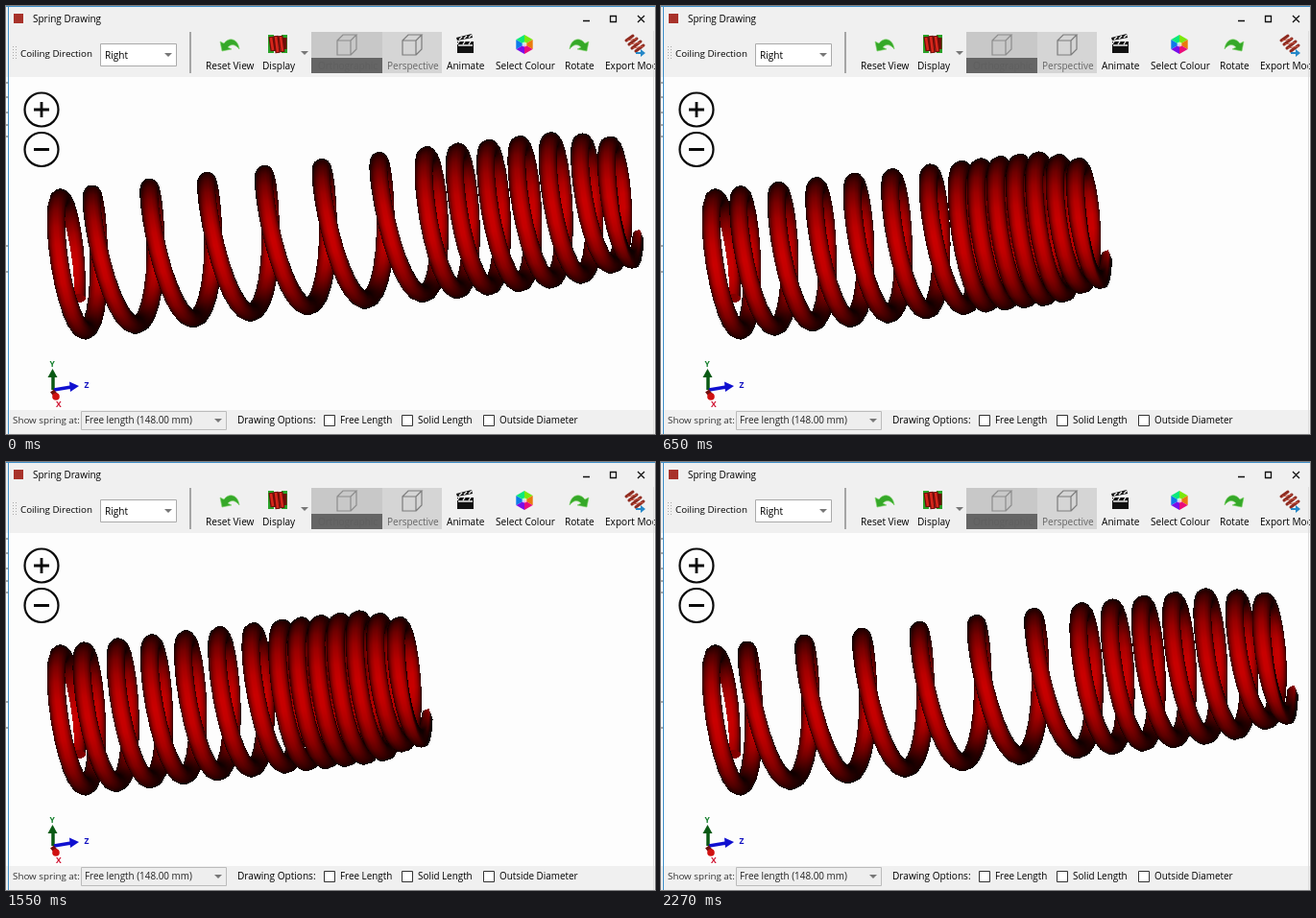
Write an HTML page with a canvas that moves like this. It is 676 px wide and 446 px high and loops after 2.31 s.

```html
<!DOCTYPE html>
<html lang="en">
<head>
<meta charset="utf-8">
<title>Spring Drawing</title>
<style>
html, body { margin: 0; width: 100%; height: 100%; overflow: hidden; background: #fff; }
svg, canvas { position: absolute; left: 0; top: 0; width: 676px; height: 446px; }
text { font-family: "Open Sans", "Noto Sans", sans-serif; }
</style>
</head>
<body>
<svg viewBox="0 0 676 446">
  <defs>
    <path id="turn" d="M-10 -3L-8 7L2 5L-2 3C2 -1 6 0 10 5C9 -5 0 -9 -6 -1Z" fill="#35a828" stroke="#7fd46a" stroke-width=".6"/>
    <path id="cube" d="M-10 -5H4V10H-10ZM-10 -5L-4 -11H10L4 -5M10 -11V4L4 10" fill="none" stroke-width="1.2"/>
    <path id="drop" d="M-4 -2H4L0 2Z" fill="#777"/>
  </defs>
  <path d="M0 0H676V74H0ZM0 421H676V446H0Z" fill="#f0f0f0"/>
  <path d="M3 74H674V421H3Z" fill="#fdfdfd"/>
  <path d="M0 .5H676M2.5 0V446" stroke="#3f8fc9"/>
  <path d="M0 80H2M0 95H2M0 111H2M0 124H2M0 136H2M0 250H2M0 277H2" stroke="#555"/>
  <rect x="8" y="8" width="10" height="10" fill="#a8322a"/>
  <path d="M601 15.5H608M629.5 10.5H635.5V16.5H629.5ZM658 10L665 17M665 10L658 17" fill="none" stroke="#111" stroke-width="1.3"/>
  <path d="M7.5 42V57M10.5 42V57" stroke="#aaa" stroke-dasharray="1 2"/>
  <path d="M98.5 39.5H177.5V62.5H98.5Z" fill="#fff" stroke="#aaa"/>
  <use href="#drop" x="169" y="51"/>
  <path d="M192 27V70" stroke="#8c8c8c" stroke-width="1.5"/>
  <use href="#turn" x="233" y="40"/>
  <use href="#turn" transform="translate(597 40) scale(-1 1)"/>
  <path d="M273 30H279V49H273ZM287 30H293V49H287Z" fill="#29a329"/>
  <path d="M276 32L278 47M281 31L283 49M286 31L288 48M290 33L290 45" stroke="#6e0d08" stroke-width="5"/>
  <path d="M276 33L278 46M281 32L283 48M286 32L288 47" stroke="#d8261c" stroke-width="2.6"/>
  <use href="#drop" x="311" y="49"/>
  <path d="M318 27H392V54H318Z" fill="#c8c8c8"/>
  <path d="M318 54H392V70H318Z" fill="#656565"/>
  <path d="M392 27H454V70H392Z" fill="#d5d5d5"/>
  <use href="#cube" x="355" y="41" stroke="#8c8c8c"/>
  <use href="#cube" x="423" y="41" stroke="#7c7c7c"/>
  <path d="M470 37H487V49H470ZM469 33L485 29L486 33L470 36Z" fill="#111"/>
  <path d="M472 35L475 32M477 34L480 31M482 33L485 30M472 37L470 40M478 37L476 40M484 37L482 40M471 41H486" stroke="#eee" stroke-width="1.3"/>
  <g id="hex"></g>
  <path d="M646 36L653 31M649 40L657 34M652 44L661 37M656 47L664 41" stroke="#8f2b20" stroke-width="3" stroke-linecap="round"/>
  <path d="M647 36L657 34M650 40L661 38M653 44L664 42" stroke="#c65a48"/>
  <path d="M656 48H661V45L666 49L661 53V50H656Z" fill="#2588c8"/>
  <path d="M78.5 422.5H229.5V441.5H78.5Z" fill="#eee" stroke="#bbb"/>
  <use href="#drop" x="221" y="432"/>
  <path d="M331.5 426.5h11v11h-11ZM412.5 426.5h11v11h-11ZM497.5 426.5h11v11h-11Z" fill="#fff" stroke="#333"/>
  <g id="labels"></g>
  <path d="M674.5 26V446" stroke="#ddd"/>
</svg>
<canvas id="spring" width="676" height="446"></canvas>
<svg viewBox="0 0 676 446">
  <g fill="none" stroke="#0a0a0a" stroke-width="2.2">
    <circle cx="37" cy="108" r="17.5"/><circle cx="37" cy="149.5" r="17.5"/>
    <path d="M29 108H45M37 100V116M29 149.5H45" stroke-width="2.8"/>
  </g>
  <path d="M49 400V385" stroke="#0a5a14" stroke-width="3.5"/>
  <path d="M43.5 387L48.5 378L53.5 387Z" fill="#0a5a14"/>
  <path d="M50 400L68 397" stroke="#1010d0" stroke-width="3.5"/>
  <path d="M66 391.5L76 396L67 402Z" fill="#1010d0"/>
  <path d="M48 401L53 407" stroke="#701010" stroke-width="5"/>
  <circle cx="52" cy="407" r="3.8" fill="#d01010"/>
  <g font-weight="bold" font-size="8.5">
    <text x="45.5" y="376" fill="#0a7a24">Y</text>
    <text x="81.5" y="398" fill="#1010c0">Z</text>
    <text x="52" y="418" fill="#d01030">X</text>
  </g>
</svg>
<script>
const LOOP = 2310, TAU = Math.PI * 2, W = 676, H = 446;

const labels = [
  [28, 17, "Spring Drawing", 10], [15, 53, "Coiling Direction", 9.8], [103, 55, "Right"],
  [208, 66, "Reset View"], [267, 66, "Display"], [325, 66, "Orthographic", 10, "#5f5f5f"],
  [397, 66, "Perspective", 10, "#666"], [459, 66, "Animate"], [510, 66, "Select Colour"],
  [582, 66, "Rotate"], [624, 66, "Export Model"], [7, 435, "Show spring at:", 9.8, "#333"],
  [82, 435, "Free length (148.00 mm)", 9.9, "#222"], [241, 435, "Drawing Options:"],
  [348, 435, "Free Length", 9.9], [429, 435, "Solid Length", 9.9], [514, 435, "Outside Diameter", 9.9]
];
document.getElementById("labels").innerHTML = labels.map(([x, y, s, size = 10.1, fill = "#000"]) =>
  `<text x="${x}" y="${y}" font-size="${size}" fill="${fill}">${s}</text>`).join("");

const corner = i => `${540 + 10 * Math.sin(i * TAU / 6)} ${40 - 10 * Math.cos(i * TAU / 6)}`;
document.getElementById("hex").innerHTML = [0, 1, 2, 3, 4, 5].map(i =>
  `<path d="M540 40L${corner(i)}L${corner(i + 1)}Z" fill="hsl(${90 - i * 60} 90% 48%)"/>`).join("") +
  '<circle cx="540" cy="40" r="2.5" fill="#fff" opacity=".7"/>';

// Moments at which the pose advances, and the cycle angle (degrees) by step.
const times = [30, 90, 150, 210, 270, 370, 460, 550, 580, 650, 750, 800, 860, 1000, 1030,
  1240, 1300, 1360, 1420, 1480, 1550, 1650, 1700, 1750, 1820, 1930, 2000, 2070, 2130, 2200, 2270];
const knots = [[0, 0], [5, 57], [8, 85], [10, 105], [13, 143], [15, 180],
  [21, 245], [24, 275], [25, 283.5], [31, 356]];

function angleAt(step) {
  const i = Math.max(1, knots.findIndex(k => k[0] >= step));
  const [s0, a0] = knots[i - 1], [s1, a1] = knots[i];
  return a0 + (a1 - a0) * (step - s0) / (s1 - s0);
}

const clamp = (x, lo, hi) => Math.min(hi, Math.max(lo, x));
const smooth = x => { x = clamp(x, 0, 1); return x * x * (3 - 2 * x); };
// Integral of a linear ramp centred on c, 0.4 turns wide.
const ramp = (x, c) => {
  const u = clamp(x - c + 0.2, 0, 0.4);
  return u * u / 0.8 + Math.max(0, x - c - 0.2);
};

const START = -0.335, END = 13.65, RINGS = 336, SIDES = 16;
const WIRE = 9.4, RADIUS = 69.8, PITCH = 20.15, SLOPE = 0.1125, TILT = 0.19, FACE = 0.982;
const ctx = document.getElementById("spring").getContext("2d");
const image = ctx.createImageData(W, H);
const zbuf = new Float32Array(W * H);

// Open coils compress first; the dense coils share the last part of the travel.
function axial(turn, open, dense) {
  return PITCH * turn + open * (ramp(turn, 0.67) - ramp(turn, 6.63)) +
    dense * (ramp(turn, 6.63) - ramp(turn, 12.65));
}

const project = (a, v, d) => ({
  x: 64.5 + a - 0.115 * v - TILT * d,
  y: 269.5 - SLOPE * a - v + 0.02 * d,
  z: d * FACE + a * TILT
});

// Depth-tested triangle with interpolated shade.
function triangle(p, q, r) {
  const area = (q.x - p.x) * (r.y - p.y) - (r.x - p.x) * (q.y - p.y);
  if (Math.abs(area) < 1e-6) return;
  const x0 = Math.ceil(Math.min(p.x, q.x, r.x) - 0.5), x1 = Math.max(p.x, q.x, r.x) - 0.5;
  const y0 = Math.ceil(Math.min(p.y, q.y, r.y) - 0.5), y1 = Math.max(p.y, q.y, r.y) - 0.5;
  for (let y = y0; y <= y1; y++) {
    for (let x = x0; x <= x1; x++) {
      const dx = x + 0.5 - p.x, dy = y + 0.5 - p.y;
      const u = (dx * (r.y - p.y) - dy * (r.x - p.x)) / area;
      const v = (dy * (q.x - p.x) - dx * (q.y - p.y)) / area;
      if (u < 0 || v < 0 || u + v > 1) continue;
      const z = p.z + u * (q.z - p.z) + v * (r.z - p.z), o = y * W + x;
      if (z <= zbuf[o]) continue;
      zbuf[o] = z;
      image.data[o * 4] = p.shade + u * (q.shade - p.shade) + v * (r.shade - p.shade);
      image.data[o * 4 + 3] = 255;
    }
  }
}

function cap(ring) {
  const flat = ring.map(p => ({ ...p, shade: 130 }));
  for (let j = 2; j < SIDES; j++) triangle(flat[0], flat[j - 1], flat[j]);
}

function drawSpring(step) {
  const ext = 308 * (1 + Math.cos(angleAt(step) * Math.PI / 180)) / 2;
  const open = ext < 162.25 ? ext / 5.9 : 27.5 + (ext - 162.25) / 12;
  const dense = Math.max(0, open - 27.5);
  const lo = axial(START, open, dense), hi = axial(END, open, dense);
  const rings = [];

  for (let i = 0; i <= RINGS; i++) {
    const turn = START + (END - START) * i / RINGS, phi = turn * TAU;
    const c = Math.cos(phi), s = Math.sin(phi), a = axial(turn, open, dense);
    const radius = RADIUS + 0.0035 * a - 11.5 * smooth((turn - 11) / 2.2);
    const lit = 0.42 + 0.58 * Math.sqrt(Math.abs(s));
    const ring = [];
    for (let j = 0; j < SIDES; j++) {
      const psi = j / SIDES * TAU, out = Math.cos(psi), along = Math.sin(psi);
      const r = radius + WIRE * out;
      // The ends are ground flat, so nothing passes lo or hi.
      const p = project(clamp(a + WIRE * along, lo, hi), r * c, r * s);
      const facing = along * TILT + out * s * FACE;
      p.shade = 12 + 194 * Math.max(0, facing) ** 1.25 * lit;
      ring.push(p);
    }
    rings.push(ring);
  }

  image.data.fill(0);
  zbuf.fill(-1e9);
  for (let i = 0; i < RINGS; i++) {
    for (let j = 0; j < SIDES; j++) {
      const k = (j + 1) % SIDES, a = rings[i], b = rings[i + 1];
      triangle(a[j], a[k], b[k]);
      triangle(a[j], b[k], b[j]);
    }
  }
  cap(rings[0]);
  cap(rings[RINGS]);
  ctx.putImageData(image, 0, 0);
}

let shown = -1;
function tick(now) {
  const t = now % LOOP;
  const step = times.filter(x => x <= t).length;
  if (step !== shown) drawSpring(shown = step);
  requestAnimationFrame(tick);
}
requestAnimationFrame(tick);
</script>
</body>
</html>
```
